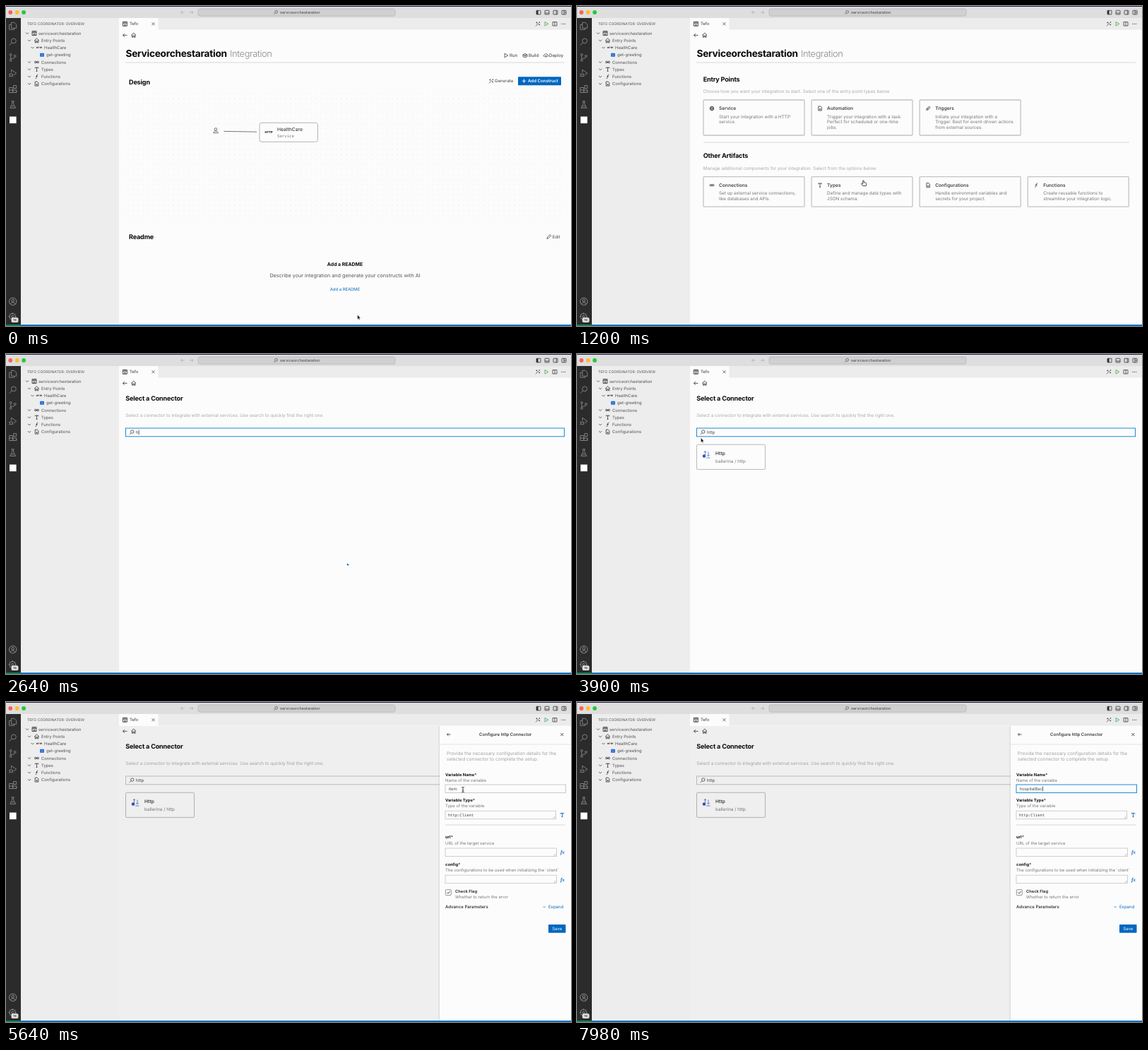
Write an HTML page that moves like this. It is 800x453 px and loops after 8000 ms.

```html
<!DOCTYPE html>
<html lang="en">
<head>
<meta charset="utf-8">
<title>Connector setup</title>
<style>
  html, body { margin: 0; width: 100%; height: 100%; overflow: hidden; background: #fcfcfc; }
  svg { display: block; width: 100vw; height: 100vh; }
  text { font-family: Inter, "Open Sans", sans-serif; white-space: pre; text-rendering: geometricPrecision; }
  .mono { font-family: "DejaVu Sans Mono", monospace; }
  .head { letter-spacing: -.02em; }
  .light { letter-spacing: -.03em; }
  .fx { font-family: "Liberation Serif", serif; font-style: italic; }
</style>
</head>
<body>
<svg id="stage" viewBox="0 0 800 453" preserveAspectRatio="none"></svg>
<script>
const LOOP = 8000;
const BLUE = '#0067c0';

// Drawing helpers; text is placed by its left edge and the middle of its capitals.
const text = (x, y, str, { size = 5.9, fill = '#505050', weight = 400, cls = '', anchor = 'start', id = '' } = {}) =>
  `<text x="${x}" y="${y + size * 0.36}" font-size="${size}" fill="${fill}" font-weight="${weight}" class="${cls}" text-anchor="${anchor}" id="${id}">${str}</text>`;
const rect = (x, y, w, h, fill, attrs = '') =>
  `<rect x="${x}" y="${y}" width="${w}" height="${h}" fill="${fill}" ${attrs}/>`;
const frame = (x, y, w, h, color, r = 0, width = 1, attrs = '') =>
  rect(x, y, w, h, 'none', `stroke="${color}" stroke-width="${width}" rx="${r}" ${attrs}`);
const line = (x1, y1, x2, y2, color, width = .8) =>
  `<path d="M${x1} ${y1}L${x2} ${y2}" stroke="${color}" stroke-width="${width}"/>`;
const group = (id, ...parts) => `<g id="${id}">${parts.join('')}</g>`;

const circle = (x, y, r) => `M${x - r} ${y}a${r} ${r} 0 1 0 ${2 * r} 0a${r} ${r} 0 1 0 ${-2 * r} 0`;
const SHAPES = {
  files: 'M-2-5H2L5-2V3H-2ZM-2-2H-5V5H2V3',
  search: circle(1.2, -1.2, 3.4) + 'M-1.3 1.3L-5 5',
  branch: circle(-3, -4, 1.4) + circle(-3, 4, 1.4) + circle(3, -2, 1.4) + 'M-3-2.6V2.6M3-.6C3 2-3 .5-3 2.6',
  debug: 'M-2-1V-5L5 0L1 3' + circle(-2.5, 2.5, 2) + 'M-5.5 1L-4 2M-5.5 5L-4 4M.5 1L-1 2M.5 5L-1 4',
  blocks: 'M-5-2H0V5H-5ZM-5 1.5H5V5H0M0 1.5V5M5 5V1.5M1-5H5V-1H1Z',
  flask: 'M-2-5H2M-1-5V-1L-4 4.6H4L1-1V-5M-2.5 2H2.5',
  account: circle(0, 0, 5.2) + circle(0, -1.2, 1.8) + 'M-3.4 3.8C-2.6.6 2.6.6 3.4 3.8',
  gear: circle(0, 0, 4.2) + circle(0, 0, 1.5) + 'M0-5.5V-4M0 4V5.5M-5.5 0H-4M4 0H5.5M-3.9-3.9L-3-3M3 3L3.9 3.9M-3.9 3.9L-3 3M3-3L3.9-3.9',
  chevron: 'M-2-1L0 1L2-1',
  project: 'M-3-3H3V3H-3ZM-3-1H3M-1-3V-1M1-3V-1M-1 3V1H1V3',
  home: 'M-3.2 0L0-3L3.2 0M-2.3-.8V3H-.7V.8H.7V3H2.3V-.8',
  link: circle(-1.7, 0, 1.3) + circle(1.7, 0, 1.3) + 'M-1.4 0H1.4',
  type: 'M-2.3-1.5V-2.6H2.3V-1.5M0-2.6V2.6M-1 2.6H1',
  func: 'M1.8-2.5C.2-3.2 0-1.5-.2 0C-.5 2-.6 3-1.8 2.6M-1.2-.4H1.3',
  doc: 'M-2.3-3H.8L2.3-1.5V3H-2.3ZM-1 1H1M0 0V2',
  globe: circle(0, 0, 2.8) + 'M-2.8 0H2.8M0-2.8C-1.8-1-1.8 1 0 2.8C1.8 1 1.8-1 0-2.8',
  trigger: 'M-2.8 2.8L-1 1M-1.6-.2L.2 1.6L-1 2.5L-2.5 1ZM1 .8L-.8-1L.8-2.5L2.5-.8ZM1.7-1.7L2.9-2.9',
  back: 'M3 0H-3M-.6-2.4L-3 0L-.6 2.4',
  forward: 'M-2.5 0H2.5M.5-2L2.5 0L.5 2',
  close: 'M-2-2L2 2M-2 2L2-2',
  play: 'M-2-2.8L2.8 0L-2 2.8Z',
  build: 'M-3-1.2L0-2.6L3-1.2V1.6L0 2.7L-3 1.6ZM-3-.3H3M-1 .8H1',
  cloud: 'M-1.2 1.6H-2C-4 1.4-3.6-1-1.8-.9C-1.3-3 1.7-2.8 1.8-.8C4-1 4 1.6 2 1.6H1.2M0 3V0M-1 1L0 0L1 1',
  wand: 'M-3 3L1.2-1.2M-1.6-2.8V-.8M-2.6-1.8H-.6M2.2.2V2M1.3 1.1H3.1M2.4-3V-1.6M1.7-2.3H3.1',
  pencil: 'M-2.8 2.8L-2.2.8L1.6-3L3-1.6L-.8 2.2Z',
  person: circle(0, -1.8, 1.8) + 'M-3.2 3.4C-3.2-.2 3.2-.2 3.2 3.4Z',
  split: 'M-3-2.7H3V2.7H-3ZM0-2.7V2.7',
  plus: 'M-2.7 0H2.7M0-2.7V2.7',
  check: 'M-2 0L-.5 1.6L2.3-1.7'
};
const icon = (name, x, y, color = '#333', scale = 1, width = .75) =>
  `<path d="${SHAPES[name]}" transform="translate(${x} ${y}) scale(${scale})" fill="none" stroke="${color}" stroke-width="${width / scale}" stroke-linejoin="round"/>`;

function windowChrome() {
  const lights = ['#fe5f57', '#fdbc2e', '#28c840'];
  const tree = [
    [46, 30, 'project', 40, 'serviceorchestaration'], [50, 33, 'home', 43.5, 'Entry Points'],
    [54, 37.5, '', 47, 'HealthCare'], [57, 0, '', 51, 'get-greeting'],
    [50, 33, 'link', 43.5, 'Connections'], [50, 33, 'type', 43.5, 'Types'],
    [50, 33, 'func', 43.5, 'Functions'], [50, 33, 'doc', 43.5, 'Configurations']
  ];
  const rows = tree.map(([x, chevronX, name, iconX, label], i) => {
    const y = 38.6 + i * 10.22;
    return (chevronX ? icon('chevron', chevronX, y) : '') + (name ? icon(name, iconX, y, '#222') : '') + text(x, y, label);
  });
  const activity = ['files', 'search', 'branch', 'debug', 'blocks', 'flask']
    .map((name, i) => icon(name, 9.7, 28.3 + i * 22.3, '#8a8a8a', 1, .9));
  return [
    rect(0, 0, 800, 17, '#dedede'), rect(0, 0, 800, 1, '#17243f'),
    ...lights.map((c, i) => `<circle cx="${6.3 + i * 9.4}" cy="9" r="2.9" fill="${c}"/>`),
    icon('back', 250, 9, '#aaa', .85), icon('forward', 262.5, 9, '#aaa'),
    frame(272, 4, 279, 10.2, '#b9b9b9', 2.5, .8, 'style="fill:#d0d0d0"'),
    icon('search', 382, 9, '#555', .55), text(388, 9, 'serviceorchestaration', { size: 5.5, fill: '#444' }),
    ...[754, 766, 778, 790].map(x => frame(x - 3, 6.3, 6, 5.6, '#333', .5, .8)),
    rect(751, 6.3, 2.6, 5.6, '#333'), line(763, 10, 769, 10, '#333'), line(779.2, 6.3, 779.2, 12, '#333'),
    line(790, 6.3, 790, 12, '#333'), line(790, 9, 793, 9, '#333'),
    rect(0, 17, 21, 434, '#2b2b2b'), ...activity, rect(5, 156.5, 9.6, 9.6, '#fff'),
    icon('account', 9.7, 418.3, '#999', 1, .9), icon('gear', 9.2, 439.5, '#999', 1, .9),
    rect(7.5, 441, 10, 7, '#dedede', 'rx="2"'), text(12.5, 444.6, 'TE', { size: 4, fill: '#333', weight: 600, anchor: 'middle' }),
    rect(21, 17, 139, 434, '#ededed'),
    text(30, 25.3, 'TEFO COORDINATOR: OVERVIEW', { size: 5.1, fill: '#555' }), ...rows,
    text(47, 59, 'HTTP', { size: 3, weight: 800, fill: '#111', anchor: 'middle' }),
    rect(48, 66.8, 6, 5, '#2b6ad8', 'rx=".8"'), line(49.5, 69.3, 52.5, 69.3, '#a8c4f2', .7),
    rect(160, 17, 640, 16.5, '#ececec'), rect(160, 17, 55.5, 17, '#fcfcfc'),
    icon('project', 168.4, 25.3, '#222'), text(175, 25.3, 'Tefo', { fill: '#333' }), icon('close', 208.5, 25.3, '#333'),
    icon('wand', 753, 25.3, '#333'), icon('play', 765, 25.3, '#35a04a'), icon('split', 777, 25.3, '#333'),
    ...[787, 789.3, 791.6].map(x => `<circle cx="${x}" cy="25.3" r=".65" fill="#333"/>`),
    rect(0, 451, 800, 2, '#0a70bd'), rect(0, 451, 20, 2, '#16825d')
  ].join('');
}

const navigation = icon('back', 168.5, 41.4, '#222') + icon('home', 180.8, 41.2, '#222');
const heading = (x, y, str) => text(x, y, str, { size: 9.1, weight: 700, fill: '#0a0a0a', cls: 'head' });
const projectTitle = [
  text(169.5, 67, 'Serviceorchestaration', { size: 13.7, weight: 700, fill: '#0a0a0a', cls: 'head' }),
  text(317, 67, 'Integration', { size: 12.9, weight: 300, fill: '#8a8a8a', cls: 'light' }),
  line(169, 80, 791, 80, '#cfcfcf')
].join('');

const overview = group('overview', projectTitle,
  icon('play', 708, 70), text(713, 70, 'Run', { size: 6.1, fill: '#333' }),
  icon('build', 735, 70), text(740, 70, 'Build', { size: 6.1, fill: '#333' }),
  icon('cloud', 764.5, 70), text(769, 70, 'Deploy', { size: 6.1, fill: '#333' }),
  heading(174, 107.3, 'Design'), icon('wand', 687, 106.3), text(692, 106.3, 'Generate', { size: 6.05, fill: '#444' }),
  rect(725, 100.2, 61, 12, BLUE, 'rx=".7"'), icon('plus', 733.5, 106.2, '#fff', 1, .9),
  text(739, 106.2, 'Add Construct', { size: 6.1, weight: 600, fill: '#fff' }),
  rect(169, 120, 621, 184, 'url(#dots)'),
  icon('person', 297, 176.3, '#444'), line(308.5, 177.4, 355, 178.2, '#777', 1),
  frame(359, 165.3, 82.5, 27, '#b4b4b4', 3, 1, 'style="fill:#fcfcfc"'),
  text(372, 178.3, 'HTTP', { size: 4, weight: 800, fill: '#111', anchor: 'middle' }),
  text(384, 174.3, 'HealthCare', { size: 6.75, fill: '#222' }),
  text(384, 183.8, 'Service', { size: 5.7, fill: '#777', cls: 'mono' }),
  heading(174, 326.6, 'Readme'), icon('pencil', 768.7, 326.7), text(773.7, 326.7, 'Edit', { size: 6.1, fill: '#444' }),
  text(480, 365.6, 'Add a README', { size: 6.9, weight: 700, fill: '#0a0a0a', anchor: 'middle' }),
  text(480, 381.5, 'Describe your integration and generate your constructs with AI', { size: 7.2, fill: '#555', anchor: 'middle' }),
  text(480, 401, 'Add a README', { fill: BLUE, anchor: 'middle' }));

const constructCard = (column, y, height, name, title, ...lines) => {
  const x = 179 + column * 153.1;
  return frame(x, y, 143, height, '#c4c4c4', 1, 1.3) + icon(name, x + 12, y + 12, '#222') +
    text(x + 22, y + 12, title, { size: 6.6, weight: 600, fill: '#444' }) +
    lines.map((str, i) => text(x + 22, y + 23.5 + i * 7.6, str, { size: 6.3, fill: '#777' })).join('');
};
const faint = { size: 6.3, fill: '#a8a8a8' };
const constructs = group('constructs', projectTitle,
  heading(178.7, 103.4, 'Entry Points'),
  text(178.7, 121, 'Choose how you want your integration to start. Select one of the entry point types below.', faint),
  constructCard(0, 133, 50, 'globe', 'Service', 'Start your integration with a HTTP', 'service.'),
  constructCard(1, 133, 50, 'doc', 'Automation', 'Trigger your integration with a task.', 'Perfect for scheduled or one-time', 'jobs.'),
  constructCard(2, 133, 50, 'trigger', 'Triggers', 'Initiate your integration with a', 'Trigger. Best for event-driven actions', 'from external sources.'),
  line(179, 193, 782, 193, '#cfcfcf'),
  heading(178.7, 212, 'Other Artifacts'),
  text(178.7, 229.5, 'Manage additional components for your integration. Select from the options below.', faint),
  constructCard(0, 241.7, 42.5, 'link', 'Connections', 'Set up external service connections,', 'like databases and APIs.'),
  constructCard(1, 241.7, 42.5, 'type', 'Types', 'Define and manage data types with', 'JSON schema.'),
  constructCard(2, 241.7, 42.5, 'doc', 'Configurations', 'Handle environment variables and', 'secrets for your project.'),
  constructCard(3, 241.7, 42.5, 'func', 'Functions', 'Create reusable functions to', 'streamline your integration logic.'));

const connectors = group('connectors',
  heading(169.3, 62.3, 'Select a Connector'),
  text(169.3, 86.3, 'Select a connector to integrate with external services. Use search to quickly find the right one.', faint),
  frame(169.5, 105, 621, 11.8, '#1c8bd8', 0, 1, 'id="searchBox"'), icon('search', 178, 110.8, '#333', .65),
  text(184, 111, '', { size: 6.05, id: 'query' }), rect(184, 107.6, .7, 6.6, '#222', 'id="queryCaret"'),
  group('empty', text(169.3, 126.8, 'No connectors found', { fill: '#222' })),
  `<path id="spinner" d="M480 296.4a5.6 5.6 0 0 1 2.6 .65" fill="none" stroke="${BLUE}" stroke-width="1.7"/>`,
  group('result',
    frame(169.5, 128.2, 97, 35.2, '#b9b9c0', 1.5),
    `<g fill="none" stroke="#5b78c8" stroke-width=".9"><path d="M181.5 143V137.5M179.7 139.2L181.5 137.3L183.3 139.2M186 138.5V144.6M184.2 142.8L186 144.7L187.8 142.8M183 147H188.5"/></g>`,
    '<circle cx="180" cy="144.5" r="2.3" fill="#3558b5"/>',
    text(196, 140.3, 'Http', { size: 6.7, weight: 600, fill: '#444' }),
    text(196, 152, 'ballerina / http', { size: 6.3, fill: '#777' })));

const fieldLabel = (y, name, hint) =>
  text(622, y, `${name}<tspan fill="#333">*</tspan>`, { size: 5.8, weight: 700, fill: '#111' }) +
  text(622, y + 8.7, hint, { fill: '#777' });
const grip = (x, y) => line(x - 4, y - 1, x - 1, y - 4, '#888', .5) + line(x - 2.3, y - 1, x - 1, y - 2.3, '#888', .5);
const area = (y, width) => frame(622, y, width, 11.5, '#c9c9c9', 0, .9) + grip(622 + width, y + 11.5);
const fxMark = y => text(788, y, 'fx', { size: 7.5, weight: 700, fill: '#1b6fc2', cls: 'fx', anchor: 'middle' });
const panel = group('panel',
  rect(612.5, 34, 1.5, 417, '#000', 'opacity=".07"'), rect(614, 34, 186, 417, '#fcfcfc'),
  icon('back', 627, 46, '#222', .85), icon('close', 787.3, 46, '#222'),
  text(707.3, 46.3, 'Configure http Connector', { size: 6.1, weight: 500, fill: '#222', anchor: 'middle' }),
  line(614, 60, 800, 60, '#dcdcdc'),
  text(624, 72.3, 'Provide the necessary configuration details for the', { size: 6.5, fill: '#a0a0a0' }),
  text(624, 80.8, 'selected connector to complete the setup.', { size: 6.5, fill: '#a0a0a0' }),
  fieldLabel(102.6, 'Variable Name', 'Name of the variable'),
  frame(622, 117, 170.5, 11.5, '#c9c9c9', 0, 1, 'id="nameBox"'),
  rect(626.3, 119.2, 12.6, 7.4, '#b3d4fb', 'id="selection"'),
  text(626.8, 122.8, 'item', { size: 5.85, id: 'variable' }), rect(627, 119.6, .7, 6.6, '#222', 'id="nameCaret"'),
  fieldLabel(138.6, 'Variable Type', 'Type of the variable'), area(154.2, 156.5),
  text(626, 160, 'http:Client', { size: 5.45, fill: '#444', cls: 'mono' }), icon('type', 787.5, 160, BLUE, 1, .9),
  line(622, 174, 792, 174, '#cfcfcf'),
  fieldLabel(191.2, 'url', 'URL of the target service'), area(207, 157.5), fxMark(212.5),
  fieldLabel(229.6, 'config', 'The configurations to be used when initializing the `client`'), area(245.2, 157.5), fxMark(250.8),
  frame(622.3, 265.6, 8, 8, '#777', 1.2, .8), icon('check', 626.3, 269.6, '#333', 1, .9),
  text(636, 267.5, 'Check Flag', { size: 5.75, weight: 600, fill: '#222' }),
  text(636, 275.6, 'Whether to return the error', { fill: '#777' }),
  text(622, 290.3, 'Advance Parameters', { size: 6.1, weight: 500, fill: '#222' }),
  icon('chevron', 762.3, 290.2, BLUE, .8), text(768, 290.2, 'Expand', { size: 6, fill: BLUE }),
  rect(768, 315, 24.5, 11.8, BLUE, 'rx=".7"'), text(780.2, 321, 'Save', { size: 6, fill: '#fff', anchor: 'middle' }));

const pointers = group('pointer',
  '<path id="arrow" d="M0 0V6.8L1.6 5.4L2.6 7.7L3.7 7.2L2.7 5H4.8Z" fill="#111" stroke="#fff" stroke-width=".6"/>',
  '<path id="hand" d="M-.8 .6C-.8-.4 .7-.4 .7 .6V3C2 2.7 4.2 3 4.3 4.3L3.8 7.6H-.9L-2.8 4.9C-3.1 4-2 3.6-.8 4.8Z" fill="#fff" stroke="#111" stroke-width=".75"/>',
  '<path id="beam" d="M-1.8-3.6Q0-3.6 0-2.4Q0-3.6 1.8-3.6M0-2.6V2.8M-1.8 3.8Q0 3.8 0 2.6Q0 3.8 1.8 3.8M-.9 .9H.9" fill="none" stroke="#222" stroke-width=".8"/>');

const stage = document.getElementById('stage');
stage.innerHTML =
  '<defs><pattern id="dots" x="169" y="120" width="7.2" height="7.2" patternUnits="userSpaceOnUse"><circle cx="3.6" cy="3.6" r=".55" fill="#dedede"/></pattern></defs>' +
  rect(0, 0, 800, 453, '#fcfcfc') + navigation + overview + constructs + connectors +
  rect(160, 34, 640, 417, '#000', 'id="shade"') + panel + windowChrome() + pointers;

const el = Object.fromEntries([...stage.querySelectorAll('[id]')].map(node => [node.id, node]));
const show = (id, on) => { el[id].style.display = on ? '' : 'none'; };
const ease = p => p * p * (3 - 2 * p);
const progress = (t, from, to) => Math.min(1, Math.max(0, (t - from) / (to - from)));
const typed = (str, t, start, step) => str.slice(0, Math.max(0, Math.floor((t - start) / step) + 1));
const blink = t => Math.floor(t / 500) % 2 === 0;

// Pointer stops: time, x, y; and the time at which each pointer shape takes over.
const STOPS = [[0, 497.5, 437], [780, 755, 106], [900, 755, 106], [1200, 405.5, 247], [1540, 196.3, 253.6],
  [3480, 196.3, 253.6], [3860, 175.3, 118.6], [3940, 175.3, 118.6], [4220, 212, 143], [4860, 212, 143], [5600, 647, 124], [LOOP, 647, 124]];
const POINTERS = [[0, 'arrow'], [720, 'hand'], [900, 'arrow'], [1140, 'hand'], [1800, 'arrow'], [2640, ''],
  [3480, 'arrow'], [4060, 'hand'], [4400, 'arrow'], [5460, 'beam'], [6600, '']];

function movePointer(t) {
  const next = STOPS.findIndex(stop => stop[0] > t);
  const [t0, x0, y0] = STOPS[next - 1], [t1, x1, y1] = STOPS[next];
  const p = ease(progress(t, t0, t1));
  el.pointer.setAttribute('transform', `translate(${x0 + (x1 - x0) * p} ${y0 + (y1 - y0) * p})`);
  const shape = POINTERS.filter(([start]) => start <= t).pop()[1];
  ['arrow', 'hand', 'beam'].forEach(id => show(id, id === shape));
}

function placeCaret(caretId, textId, x, on, empty = false) {
  show(caretId, on);
  if (on) el[caretId].setAttribute('x', x + (empty ? 0 : el[textId].getComputedTextLength() + .2));
}

function render(t) {
  show('overview', t < 900);
  show('constructs', t >= 900 && t < 1800);
  show('connectors', t >= 1800);

  const query = typed('http', t, 2640, 140);
  el.query.textContent = query || 'Search';
  el.query.setAttribute('fill', query ? '#444' : '#777');
  const searching = t >= 1800 && t < 4320;
  el.searchBox.setAttribute('stroke', searching ? '#1c8bd8' : '#c4c4c4');
  placeCaret('queryCaret', 'query', 184, searching && blink(query ? Math.max(0, t - 3060) : t - 1800), !query);
  show('empty', t < 2640);
  show('spinner', t >= 2640 && t < 3480);
  el.spinner.setAttribute('transform', `rotate(${32 + (t - 2640) * .36} 480 302)`);
  show('result', t >= 3480);

  const open = ease(progress(t, 4360, 4640));
  show('panel', open > 0);
  el.panel.setAttribute('transform', `translate(${190 * (1 - open)} 0)`);
  el.shade.setAttribute('opacity', .05 * open);

  const name = typed('hospitalBackend', t, 6600, 130);
  const focused = t >= 6000;
  el.variable.textContent = name || 'item';
  el.nameBox.setAttribute('stroke', focused ? '#1c8bd8' : '#c9c9c9');
  show('selection', t >= 6180 && !name);
  placeCaret('nameCaret', 'variable', 626.8, focused && (!!name || t < 6180));
  movePointer(t);
}

function tick() {
  render(performance.now() % LOOP);
  requestAnimationFrame(tick);
}
tick();
</script>
</body>
</html>
```
